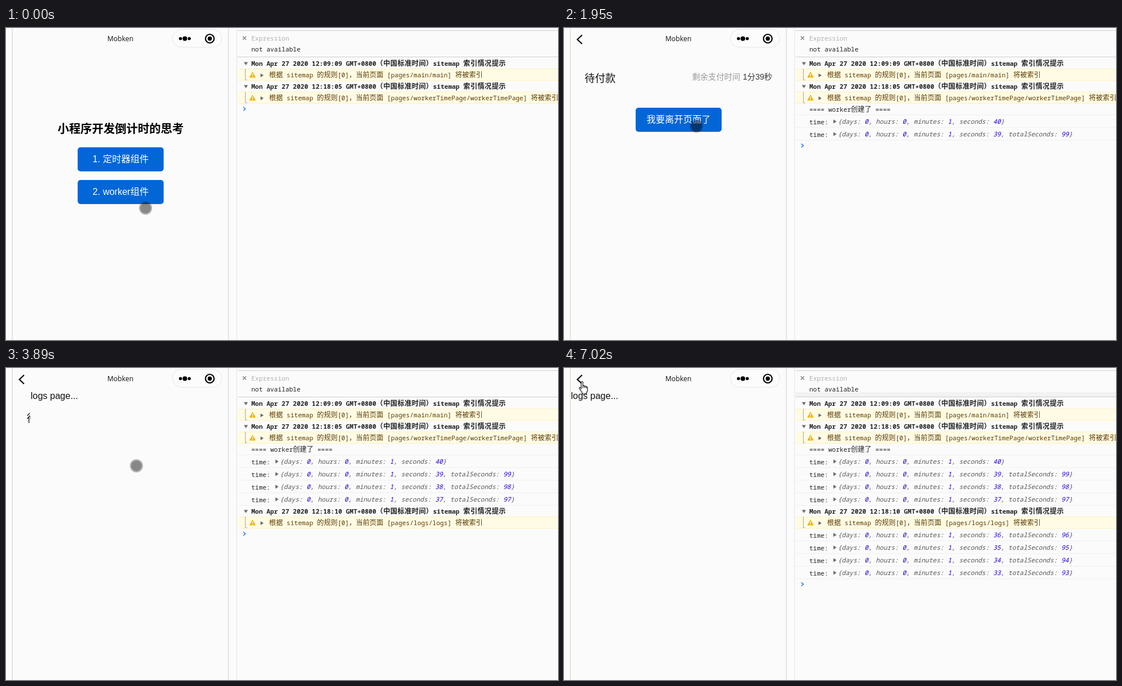
Animation of 963 by 544 pixels, one loop 8 s. Source, as an HTML page:

```html
<!DOCTYPE html>
<html lang="zh">
<head>
<meta charset="utf-8">
<title>Countdown worker demo</title>
<style>
html, body { margin: 0; width: 100%; height: 100%; overflow: hidden; background: #fbfbfb; }
svg { display: block; width: 963px; height: 544px; }
text { white-space: pre; }
.ui { font-family: "Liberation Sans", "Noto Sans CJK SC", "Noto Sans CJK", sans-serif; font-size: 16px; }
.title { font: 12px "Open Sans", "Noto Sans", sans-serif; }
.log { font: 11px "Noto Sans Mono", "DejaVu Sans Mono", monospace; }
.log .zh { font-family: "Noto Sans CJK SC", "Noto Sans CJK", sans-serif; font-size: 12px; }
.bold { font-weight: 700; }
.bold .zh { letter-spacing: .4px; }
.obj { font-style: italic; }
</style>
</head>
<body>
<svg id="stage" viewBox="0 0 963 544">
  <defs>
    <clipPath id="phone"><rect x="12" y="36" width="375.5" height="508"/></clipPath>
  </defs>
</svg>
<script>
const LOOP = 8000, PAPER = '#fbfbfb', BLUE = '#0366d6';
const stage = document.getElementById('stage');
const timed = [];

function add(parent, tag, attrs, content) {
  const el = document.createElementNS('http://www.w3.org/2000/svg', tag);
  for (const k in attrs) el.setAttribute(k, attrs[k]);
  if (content !== undefined) el.textContent = content;
  parent.append(el);
  return el;
}
const group = (parent, attrs = {}) => add(parent, 'g', attrs);
const rect = (parent, x, y, width, height, fill, rx = 0) =>
  add(parent, 'rect', { x, y, width, height, fill, rx });
const path = (parent, d, fill, stroke = 'none', w = 1) =>
  add(parent, 'path', { d, fill, stroke, 'stroke-width': w });
const disc = (parent, cx, cy, r, fill, stroke = 'none', w = 0) =>
  add(parent, 'circle', { cx, cy, r, fill, stroke, 'stroke-width': w });
const label = (parent, x, y, str, fill, size = 16, extra = {}) =>
  add(parent, 'text', { x, y, fill, class: 'ui', style: `font-size:${size}px`, ...extra }, str);

// Show an element from a given time on
function from(el, t) {
  timed.push({ el, t });
  return el;
}

// Last row of a step table that has started
function stepAt(steps, t) {
  let row = steps[0];
  for (const s of steps) if (s[0] <= t) row = s;
  return row;
}

// Console text: Latin in mono, Chinese in its own size
function logText(parent, x, y, str, fill, cls = '') {
  const text = add(parent, 'text', { x, y, fill, class: 'log ' + cls });
  for (const run of str.match(/[\u3000-\uffef]+|[^\u3000-\uffef]+/g))
    add(text, 'tspan', { class: run.charCodeAt(0) >= 0x3000 ? 'zh' : '' }, run);
  return text;
}

/* ---------- phone ---------- */
rect(stage, 0, 0, 963, 544, PAPER);
const screen = group(stage, { 'clip-path': 'url(#phone)' });

function button(parent, y, str) {
  const box = rect(parent, 125, y, 150, 42, BLUE, 5);
  label(parent, 200, y + 26, str, '#fff', 16, { 'text-anchor': 'middle' });
  return box;
}

function page() {
  const g = group(screen);
  rect(g, 12, 36, 376, 508, PAPER);
  return g;
}

const home = page();
label(home, 200, 183, '小程序开发倒计时的思考', '#000', 20, { 'text-anchor': 'middle', 'font-weight': 700 });
button(home, 208, '1. 定时器组件');
button(home, 265, '2. worker组件');

const pay = page();
label(pay, 36, 94, '待付款', '#111', 18);
label(pay, 223.5, 90, '剩余支付时间', '#999', 14);
const left = label(pay, 312, 90, '', '#353535', 14);
const leave = button(pay, 139, '我要离开页面了');

const logs = page();
label(logs, 12, 54, 'logs page...', '#111');

rect(stage, 10, 0, 2, 544, '#e4e4e4');
rect(stage, 387, 0, 2, 544, '#e4e4e4');
add(stage, 'text', { x: 199.5, y: 23, fill: '#111', class: 'title', 'text-anchor': 'middle' }, 'Mobken');
from(path(stage, 'M31.5 12.2L23.3 20l8.2 7.8', 'none', '#000', 2.1), 120);

add(stage, 'rect', { x: 290.5, y: 2.5, width: 86, height: 31, rx: 15.5, fill: '#fcfcfc', stroke: '#e7e7e7' });
disc(stage, 304.4, 18.5, 2.7, '#000');
disc(stage, 312, 18.5, 4, '#000');
disc(stage, 319.7, 18.5, 2.7, '#000');
disc(stage, 355.5, 18.5, 7.5, 'none', '#000', 2.2);
disc(stage, 355.5, 18.5, 3.7, '#000');

/* ---------- console ---------- */
rect(stage, 402, 0, 1, 544, '#e6e6e6');
rect(stage, 404, 4, 559, 1, '#cfcfcf');
from(rect(stage, 404, 42, 559, 8, '#f2f2f2'), 4160);
rect(stage, 404, 50, 559, 1, '#cfcfcf');
path(stage, 'M413 14.5l6 6m0-6l-6 6', 'none', '#888', 1.6);
logText(stage, 428, 22, 'Expression', '#b0b0b0');
logText(stage, 428, 41, 'not available', '#222');

function sitemap(y, time, route, t) {
  const g = from(group(stage), t);
  path(g, `M415 ${y - 2.5}h7l-3.5 5.5z`, '#6e6e6e');
  logText(g, 428, y + 4, `Mon Apr 27 2020 ${time} GMT+0800（中国标准时间）sitemap 索引情况提示`, '#222', 'bold');
  const w = y + 20;
  rect(g, 404, w - 11, 559, 21, '#fff3c0');
  rect(g, 404, w - 10, 559, 19, '#fffbe5');
  path(g, `M417.5 ${w - 11}v19.5h3`, 'none', '#b5a67c');
  path(g, `M430 ${w - 5}l5 9h-10z`, '#efb50f', '#efb50f', 1);
  path(g, `M430 ${w - 2.5}v3.2m0 1v1.5`, 'none', '#fff', 1.4);
  path(g, `M444 ${w - 2.7}l5.5 3.2-5.5 3.2z`, '#6e6e6e');
  logText(g, 459, w + 4, `根据 sitemap 的规则[0]，当前页面 [${route}] 将被索引`, '#5c3c00');
}

function tick(y, seconds, t) {
  const g = from(group(stage), t);
  logText(g, 428, y + 5, 'time:', '#222');
  path(g, `M470 ${y - 3.5}l5.5 3.5-5.5 3.5z`, '#6e6e6e');
  const text = add(g, 'text', { x: 478, y: y + 4, class: 'log obj' });
  const fields = { days: 0, hours: 0, minutes: 1, seconds };
  if (seconds < 40) fields.totalSeconds = 60 + seconds;
  let lead = '{';
  for (const key in fields) {
    add(text, 'tspan', { fill: '#565656' }, `${lead}${key}: `);
    add(text, 'tspan', { fill: '#1c00cf' }, fields[key]);
    lead = ', ';
  }
  add(text, 'tspan', { fill: '#565656' }, '}');
  rect(g, 404, y + 10, 559, 1, '#f0f0f0');
}

sitemap(62, '12:09:09', 'pages/main/main', 0);
sitemap(102, '12:18:05', 'pages/workerTimePage/workerTimePage', 0);
const created = from(group(stage), 120);
logText(created, 428, 146, '==== worker创建了 ====', '#222');
rect(created, 404, 151, 559, 1, '#f0f0f0');
sitemap(250, '12:18:10', 'pages/logs/logs', 3590);

const firstTicks = [250, 1140, 2070, 3160];
const lateTicks = [4160, 5120, 6120, 7020];
firstTicks.forEach((t, i) => tick(163 + 22 * i, 40 - i, t));
lateTicks.forEach((t, i) => tick(291 + 22 * i, 36 - i, t));

const prompt = path(stage, 'M414 -3.2l3.6 3.2-3.6 3.2', 'none', '#367cf1', 1.6);
const promptSteps = [
  [0, 141], [120, 161],
  ...firstTicks.map((t, i) => [t, 183 + 22 * i]),
  [3590, 289],
  ...lateTicks.map((t, i) => [t, 311 + 22 * i])
];

/* ---------- pointer ---------- */
const pointers = { touch: group(stage), arrow: group(stage), hand: group(stage) };
disc(pointers.touch, 0, 0, 11.5, 'rgba(0,0,0,.27)');
disc(pointers.touch, 0, 0, 9.3, 'rgba(0,0,0,.26)');
path(pointers.arrow, 'M.5 .5v15.5l3.6-3.5 2.6 6 2.3-1-2.5-5.8h5z', '#fff', '#000');
path(pointers.hand,
  'M5 14V2a1.5 1.5 0 0 1 3 0v6q2.6-1 3 1q2.4-1 2.8 1q2.2-.6 2.2 1.5v4q0 2-1.5 4v2.5h-8v-2.5' +
  'q-2-2.5-4.5-6.5q-1-2 .8-2.2q1.2 0 2.2 1.7zM8 8v4m3-3v3m2.8-2v2.5', '#fff', '#000', 1.1);

const pointerSteps = [
  [0, 'touch', 243.5, 314],
  [250, 'arrow', 243, 313],
  [1290, 'touch', 248.5, 320.5],
  [1410, 'touch', 250.5, 228.5],
  [1560, 'touch', 255.5, 204],
  [1680, 'touch', 249, 187],
  [1800, 'touch', 238.5, 177.5],
  [1950, 'touch', 231, 171],
  [2070, 'touch', 229.5, 169.5],
  [3890, 'touch', 227.5, 170.5],
  [4010, 'touch', 160, 137],
  [4160, 'touch', 70.5, 89.5],
  [4310, 'touch', 45.5, 78],
  [4430, 'touch', 35.5, 56],
  [4550, 'arrow', 32, 29],
  [4700, 'hand', 27, 24],
  [4820, 'hand', 26, 24],
  [4970, 'hand', 25, 23]
];

/* ---------- time ---------- */
const paySlide = [[0, 376], [250, 281], [400, 31], [550, 0]];
const logsSlide = [[0, 376], [3740, 281], [3890, 31], [4160, 0]];

const move = (el, x, y = 0) => el.setAttribute('transform', `translate(${x} ${y})`);
const show = (el, on) => el.setAttribute('visibility', on ? 'visible' : 'hidden');

function draw(now) {
  for (const { el, t } of timed) show(el, now >= t);
  move(pay, stepAt(paySlide, now)[1]);
  move(logs, stepAt(logsSlide, now)[1]);
  move(prompt, 0, stepAt(promptSteps, now)[1]);

  const passed = firstTicks.filter(t => t <= now).length;
  left.textContent = `1分${41 - Math.max(1, passed)}秒`;
  leave.setAttribute('fill', now >= 3590 ? '#035cc1' : BLUE);

  const [, kind, x, y] = stepAt(pointerSteps, now);
  for (const k in pointers) show(pointers[k], k === kind);
  move(pointers[kind], x, y);
}

const start = performance.now();
function frame() {
  draw((performance.now() - start) % LOOP);
  requestAnimationFrame(frame);
}
frame();
</script>
</body>
</html>
```
